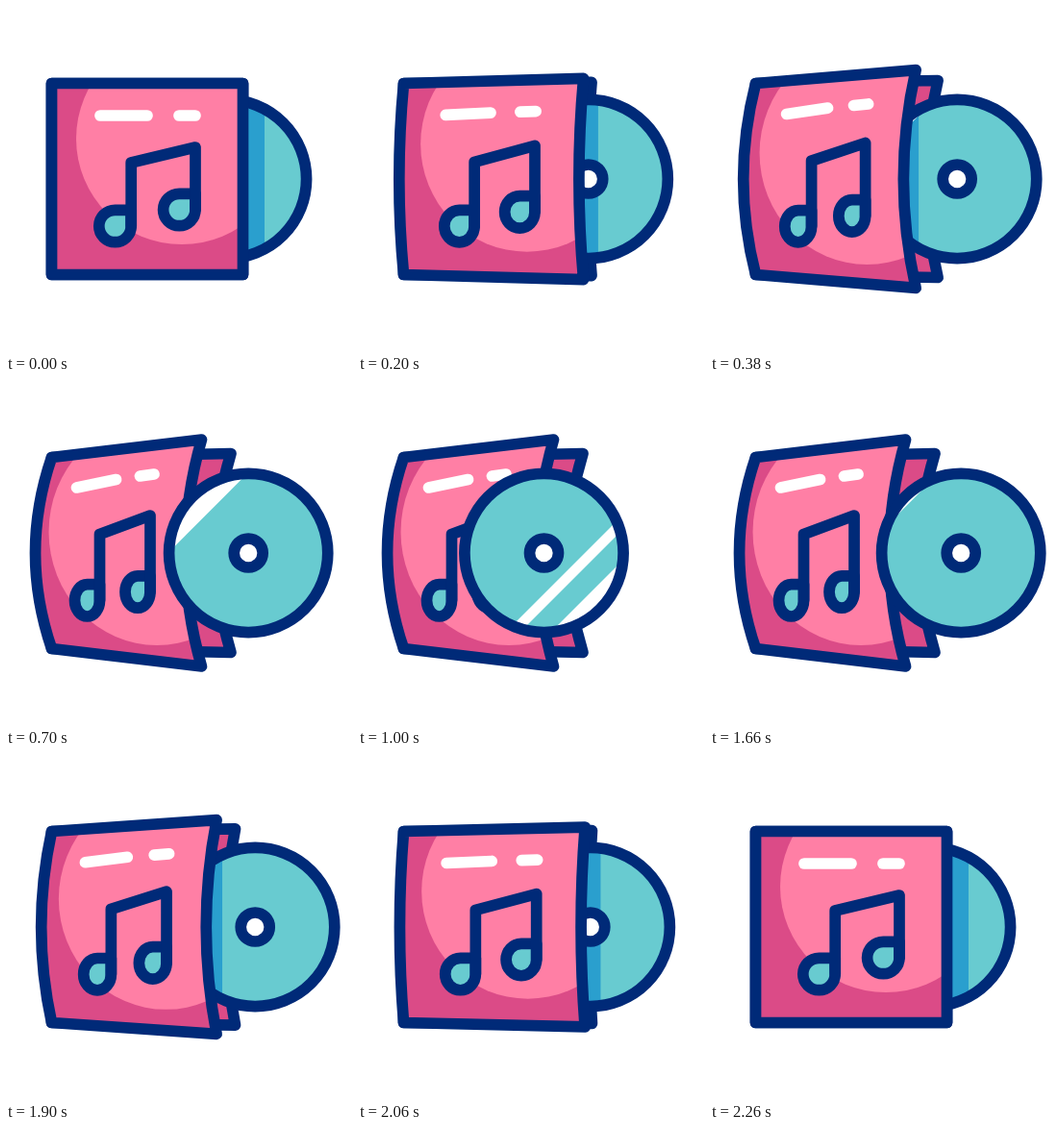
These frames come from a looping animation (360x360 px, 2.4 s). An HTML page with a canvas:

```html
<!DOCTYPE html>
<html lang="en">
<head>
<meta charset="utf-8">
<title>Record sleeve</title>
<style>
html, body { margin: 0; height: 100%; overflow: hidden; background: #fff; }
canvas { display: block; width: 100vw; height: 100vh; }
</style>
</head>
<body>
<canvas width="360" height="360"></canvas>
<script>
const LOOP = 2400, TAU = Math.PI * 2;
const NAVY = '#002a78', PINK = '#ff7fa5', ROSE = '#db4b87', TEAL = '#68cbd0', BLUE = '#2a9fce';
const ctx = document.querySelector('canvas').getContext('2d');
ctx.lineJoin = ctx.lineCap = 'round';

// Sine ease from 0 to 1 between two times
const ease = (t, from, to) =>
  0.5 - 0.5 * Math.cos(Math.PI * Math.min(1, Math.max(0, (t - from) / (to - from))));
const mix = (a, b, k) => a + (b - a) * k;

function paint(path, fill, stroke, width = 11.7) {
  if (fill) { ctx.fillStyle = fill; ctx.fill(path); }
  if (stroke) { ctx.strokeStyle = stroke; ctx.lineWidth = width; ctx.stroke(path); }
}

function circle(x, y, rx, ry = rx) {
  const path = new Path2D();
  path.ellipse(x, y, rx, ry, 0, 0, TAU);
  return path;
}

function clipped(path, draw) {
  ctx.save();
  ctx.clip(path);
  draw();
  ctx.restore();
}

// Panel hinged at the left whose side edges bow to the left
function panel(right, half, bowLeft, bowRight) {
  return new Path2D(`M47.5 80.5 L${right} ${180 - half}
    Q${right - 2 * bowRight} 180 ${right} ${180 + half}
    L47.5 279.5 Q${47.5 - 2 * bowLeft} 180 47.5 80.5 Z`);
}

// Drop-shaped note head with its square corner at the top right
function noteHead(x, y, rx, ry) {
  const path = new Path2D();
  path.moveTo(x + rx, y - ry);
  path.ellipse(x, y, rx, ry, 0, 0, TAU * 0.75);
  path.closePath();
  return path;
}

function drawCover(open) {
  const shape = panel(246.5 - 43 * open, 99.5 + 18.5 * open, 17 * open, 17 * open);
  paint(shape, ROSE);
  clipped(shape, () =>
    paint(circle(183 - 26 * open, 138 + 20 * open, 110 + 2.5 * open, 110 + 8 * open), PINK));
  paint(shape, null, NAVY);

  // Each point slides from its closed to its open place
  const at = (x0, y0, x1, y1) => [mix(x0, x1, open), mix(y0, y1, open)];
  const line = (...points) => new Path2D('M' + points.join(' L'));

  paint(line(at(98, 114, 73.5, 112), at(147, 114, 114.5, 103.5)), null, '#fff', 11.7);
  paint(line(at(180, 114, 139.5, 100), at(197, 114, 154, 98)), null, '#fff', 11.7);

  const rx = mix(16.7, 13, open), ry = 16.7;
  const [leftX, leftY] = at(113.5, 229, 84.5, 229.3);
  const [rightX, rightY] = at(180.3, 212, 137, 220.5);
  paint(noteHead(leftX, leftY, rx, ry), TEAL, NAVY);
  paint(noteHead(rightX, rightY, rx, ry), TEAL, NAVY);
  paint(line(
    [leftX + rx, leftY], at(130.2, 163, 97.5, 160.5),
    at(197, 147, 150, 141), [rightX + rx, rightY]
  ), null, NAVY);
}

function drawDisc(x, shadowEdge, shine) {
  const shape = circle(x, 180, 82.6);
  paint(shape, TEAL);
  clipped(shape, () => {
    ctx.fillStyle = BLUE;
    ctx.fillRect(0, 80, shadowEdge, 200);
    // Two diagonal glints, measured along x + y
    ctx.translate(x, 180);
    ctx.rotate(Math.PI / 4);
    ctx.fillStyle = '#fff';
    const lead = -106 + 325 * shine;
    for (const [offset, width] of [[49, 49], [96, 15]])
      ctx.fillRect((lead - offset) / Math.SQRT2, -100, width / Math.SQRT2, 200);
  });
  paint(shape, null, NAVY);
  paint(circle(x, 180, 15), '#fff', NAVY);
}

function draw(t) {
  const open = ease(t, 0, 570) - ease(t, 1650, 2260);
  const slideOut = ease(t, 0, 600) - ease(t, 1727, 2260);
  const slideOver = ease(t, 600, 927) - ease(t, 1400, 1727);
  const discX = 230 + 38.5 * slideOut - 75 * slideOver;
  const inFront = t >= 600 && t < 1727;
  const shine = t < 1200 ? ease(t, 600, 1200) : 0;

  ctx.clearRect(0, 0, 360, 360);
  paint(panel(246.5 - 12.5 * open, 99.5 + 4 * open, 0, 16 * open), ROSE, NAVY);
  if (!inFront) drawDisc(discX, 269 - 69 * open, 0);
  drawCover(open);
  if (inFront) drawDisc(discX, 0, shine);
}

function tick() {
  draw(performance.now() % LOOP);
  requestAnimationFrame(tick);
}
tick();
</script>
</body>
</html>
```
